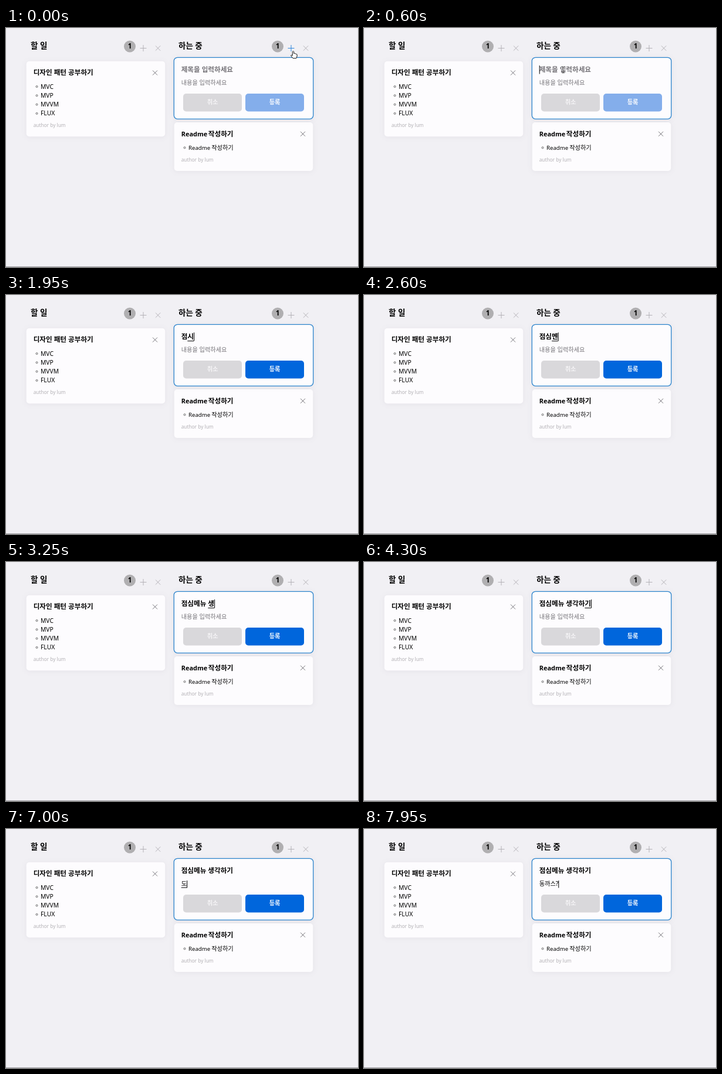
Animation, 600 px wide and 408 px high, one loop 8000 ms. Source, as an HTML page:

```html
<!DOCTYPE html>
<html lang="ko">
<head>
<meta charset="utf-8">
<style>
  html, body { margin: 0; width: 100%; height: 100%; overflow: hidden; background: #f1f0f4; }
  svg { display: block; font-family: "Noto Sans", "Noto Sans CJK KR", sans-serif; }
  text { white-space: pre; }
  .head { font-size: 13.5px; font-weight: 700; }
  .title { font-size: 11.6px; font-weight: 700; }
  .body { font-size: 10.2px; }
  .list { font-size: 10.3px; }
  .author { font-size: 8.3px; fill: #b3b1b5; }
  .button { font-size: 10.2px; font-weight: 700; text-anchor: middle; }
  .icon { fill: none; stroke: #b4b2b7; stroke-width: 1; }
  .card { fill: #fdfcfe; filter: drop-shadow(0 1px 5px rgba(70, 60, 90, .07)); }
</style>
</head>
<body>
<svg id="stage" width="600" height="408" viewBox="0 0 600 408"></svg>
<script>
const LOOP = 8000;
const stage = document.getElementById('stage');

const text = (x, y, cls, str, extra = '') => `<text x="${x}" y="${y}" class="${cls}" ${extra}>${str}</text>`;
const cross = (x, y, r, extra = '') =>
  `<path class="icon" ${extra} d="M${x - r} ${y - r}l${2 * r} ${2 * r}m0 ${-2 * r}l${-2 * r} ${2 * r}"/>`;
const box = (x, y, w, h, r, extra) => `<rect x="${x}" y="${y}" width="${w}" height="${h}" rx="${r}" ${extra}/>`;
const bullet = (x, y) => `<circle cx="${x}" cy="${y}" r="1.5" fill="none" stroke="#444" stroke-width=".8"/>`;

const column = (x, name, id) =>
  text(x + 7, 35, 'head', name) +
  `<circle cx="${x + 176}" cy="31.5" r="10" fill="#b0afb1"/>` +
  text(x + 176, 35.3, 'title', '1', 'text-anchor="middle"') +
  `<path id="${id}" class="icon" d="M${x + 193.5} 34.5h11m-5.5 -5.5v11"/>` +
  cross(x + 224, 34.5, 4.2);

const card = (x, y, h, title, content) =>
  box(x, y, 236.5, h, 5, 'class="card"') + title +
  cross(x + 219.3, y + 19.8, 4, 'style="stroke:#77757a"') + content +
  text(x + 12, y + h - 16, 'author', 'author by lum');

const items = ['MVC', 'MVP', 'MVVM', 'FLUX'].map((item, i) =>
  bullet(52.5, 100 + 15.3 * i) + text(59, 103.5 + 15.3 * i, 'list', item)).join('');

stage.innerHTML =
  box(0, 407, 600, 1, 0, 'fill="#9d9b9f"') +
  column(35, '할 일', 'plusLeft') + column(287, '하는 중', 'plus') +
  card(34.7, 56.7, 128.6, text(46.7, 80.4, 'title', '디자인 패턴 공부하기'), items) +
  card(286.7, 161, 83,
    text(298.7, 185, 'title', 'Readme', 'style="font-size:11px"') + text(346, 185, 'title', '작성하기', 'dx="-1.2"'),
    bullet(304.5, 204.3) + text(311, 207.7, 'list', 'Readme', 'style="font-size:9.6px"') +
    text(350.2, 207.7, 'body', '작성하기')) +
  box(286.3, 50.3, 237.4, 105, 6, 'class="card" style="stroke:#2f86cd;stroke-width:1.3"') +
  text(298.7, 74.5, 'title', '', 'id="title"') +
  text(298.7, 97, 'body', '', 'id="content"') +
  box(302, 112, 100, 30.5, 5, 'fill="#d9d8db"') +
  text(352, 130, 'button', '취소', 'fill="#f5f4f6"') +
  box(408, 112, 100, 30.5, 5, 'id="submit"') +
  text(458, 130, 'button', '등록', 'fill="#fff"') +
  box(0, 0, 10, 1, 0, 'id="underline"') +
  box(0, 0, 1, 14, 0, 'id="caret"') +
  `<path id="hand" fill="#fff" stroke="#111" stroke-width="1" stroke-linejoin="round"
    d="M-1.2 5.5V.8Q0 -.8 1.2 .8V4Q2.4 3.2 3.2 4.4Q4.4 3.7 5 5Q6.6 4.6 6.6 6.4V8.6L5.3 12.2H-.4L-4 7.6Q-3.6 5.6 -1.2 7.6Z"/>` +
  `<path id="beam" fill="none" stroke="#333" stroke-width=".9" d="M-2 -5.5Q0 -5.5 0 -4.5Q0 -5.5 2 -5.5M0 -4.5V4.5M-2 5.5Q0 5.5 0 4.5Q0 5.5 2 5.5"/>`;

const el = Object.fromEntries([...stage.querySelectorAll('[id]')].map(node => [node.id, node]));

const titleKeys = [
  [600, ''], [1150, 'ㅈ'], [1350, '저'], [1550, '점'], [1750, '점ㅅ'], [1900, '점시'], [2050, '점심'],
  [2250, '점심ㅁ'], [2400, '점심메'], [2550, '점심멘'], [2700, '점심메뉴'], [2900, '점심메뉴 '],
  [3000, '점심메뉴 ㅅ'], [3100, '점심메뉴 새'], [3200, '점심메뉴 생'], [3280, '점심메뉴 생ㄱ'],
  [3350, '점심메뉴 생가'], [3500, '점심메뉴 생각'], [3575, '점심메뉴 생각ㅎ'], [3650, '점심메뉴 생각하'],
  [3800, '점심메뉴 생각학'], [3900, '점심메뉴 생각하기']
];
const contentKeys = [
  [4550, ''], [6850, 'ㄷ'], [6980, '도'], [7110, '동'], [7240, '동ㄲ'], [7370, '동까'],
  [7500, '동까ㅅ'], [7620, '동까스'], [7750, '동까스?']
];

const lastKey = (keys, t) => keys.filter(key => key[0] <= t).pop() || [0, ''];
const clamp = v => Math.min(1, Math.max(0, v));
const set = (node, attrs) => Object.entries(attrs).forEach(([k, v]) => node.setAttribute(k, v));
const show = (node, on) => { node.style.display = on ? '' : 'none'; };
const mix = (a, b, p) => `rgb(${a.map((v, i) => Math.round(v + (b[i] - v) * p))})`;

function fill(node, value, placeholder) {
  node.textContent = value || placeholder;
  node.setAttribute('fill', value ? '#000' : '#757378');
}

function render(t) {
  const title = lastKey(titleKeys, t);
  const content = lastKey(contentKeys, t);
  fill(el.title, title[1], '제목을 입력하세요');
  fill(el.content, content[1], '내용을 입력하세요');

  const inContent = t >= 4550;
  const [since, value] = inContent ? content : title;
  const field = inContent ? el.content : el.title;
  const end = value ? 298.7 + field.getComputedTextLength() : 298.7;
  const size = inContent ? 9.4 : 10.7;
  set(el.caret, { x: end, y: inContent ? 88 : 64, height: inContent ? 12.5 : 14.5 });
  show(el.caret, t >= 600 && (t - since) % 1000 < 500);
  set(el.underline, { x: end - size, y: inContent ? 99.5 : 78, width: size });
  show(el.underline, /[^ ?]$/.test(value));

  el.submit.setAttribute('fill', mix([132, 174, 235], [0, 102, 220], clamp((t - 1200) / 500)));

  const p = clamp((t - 250) / 350);
  const move = p * p * (3 - 2 * p);
  const x = 489.5 - 150 * move, y = 39.5 + 32 * move;
  const hovering = x > 480;
  el.plus.style.stroke = hovering ? '#2f86dc' : '';
  show(el.hand, hovering);
  show(el.beam, !hovering && t < 1150);
  for (const pointer of [el.hand, el.beam]) pointer.setAttribute('transform', `translate(${x} ${y})`);
}

function tick() {
  render(performance.now() % LOOP);
  requestAnimationFrame(tick);
}
tick();
</script>
</body>
</html>
```
